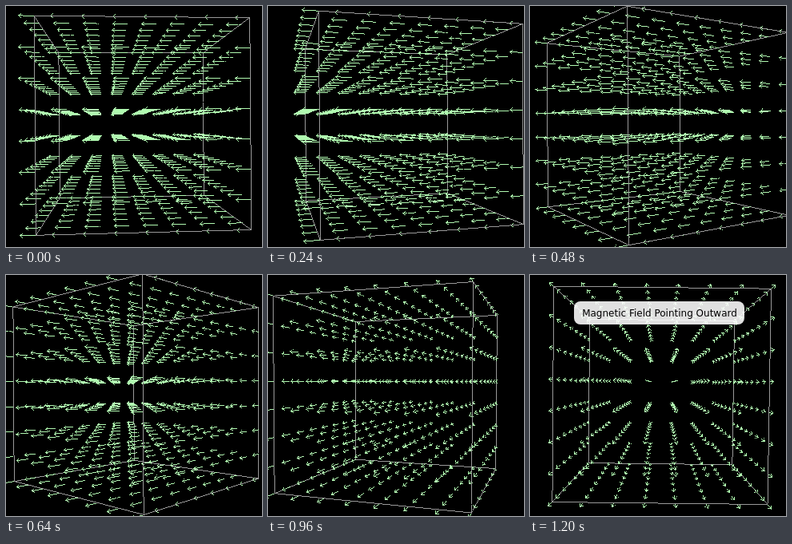
These frames come from a looping animation (320x302 px, 1.28 s). An HTML page with a canvas:

```html
<!DOCTYPE html>
<html lang="en">
<head>
<meta charset="utf-8">
<title>Rotating magnetic field</title>
<style>
  html, body { margin: 0; height: 100%; overflow: hidden; background: #000; }
  canvas { display: block; }
</style>
</head>
<body>
<canvas id="stage" width="320" height="302"></canvas>
<script>
const ctx = document.getElementById('stage').getContext('2d');
const STEP = 80, STEPS = 16;
const FOCAL = 541, DISTANCE = 5, CX = 163.5, CY = 148.2;
const GRID = 8, ARROW = 1 / 7;

// [step, yaw, pitch, roll] in degrees
const KEYS = [
  [0, 4, 0, -0.45],
  [3, 15.6, 0.2, -0.35],
  [5, 27.1, 0.36, -0.4],
  [8, 47, 0.3, -0.25],
  [10, 58.2, 0.3, 0],
  [12, 71.5, 1.75, 0.1],
  [15, 90, 1.2, 0.65]
];

function poseAt(step) {
  const i = Math.max(1, KEYS.findIndex(k => k[0] >= step));
  const a = KEYS[i - 1], b = KEYS[i];
  const t = (step - a[0]) / (b[0] - a[0]);
  return [1, 2, 3].map(j => (a[j] + (b[j] - a[j]) * t) * Math.PI / 180);
}

// Returns a function from cube space (y up, z to the viewer) to [x, y, depth]
function camera([yaw, pitch, roll]) {
  const spin = (a, b, angle) => {
    const c = Math.cos(angle), s = Math.sin(angle);
    return [a * c + b * s, b * c - a * s];
  };
  return (x, y, z) => {
    [x, z] = spin(x, z, yaw);
    [z, y] = spin(z, y, pitch);
    [x, y] = spin(x, y, roll);
    const depth = DISTANCE - z;
    return [CX + FOCAL * x / depth, CY - FOCAL * y / depth, depth];
  };
}

// Hard-edged line, one pixel wide
function line(x1, y1, x2, y2) {
  const n = Math.max(1, Math.round(Math.max(Math.abs(x2 - x1), Math.abs(y2 - y1))));
  for (let i = 0; i <= n; i++) {
    const t = i / n;
    ctx.fillRect(Math.round(x1 + (x2 - x1) * t), Math.round(y1 + (y2 - y1) * t), 1, 1);
  }
}

// Draws either the far or the near edges of the cube
function drawBox(project, far) {
  const edge = (p, q) => {
    const [x1, y1, d1] = project(...p), [x2, y2, d2] = project(...q);
    if ((d1 + d2 > 2 * DISTANCE) === far) line(x1, y1, x2, y2);
  };
  ctx.fillStyle = '#999';
  for (const a of [-1, 1]) {
    for (const b of [-1, 1]) {
      edge([-1, a, b], [1, a, b]);
      edge([a, -1, b], [a, 1, b]);
      edge([a, b, -1], [a, b, 1]);
    }
  }
}

function drawArrow(project, x, y, z) {
  const [x1, y1] = project(x, y, z);
  const [x2, y2, depth] = project(x - ARROW, y, z);
  line(x1, y1, x2, y2);
  const length = Math.hypot(x2 - x1, y2 - y1);
  if (length < 0.75) return;
  const size = 12 / depth;
  const ux = (x2 - x1) / length * size, uy = (y2 - y1) / length * size;
  for (const side of [-0.8, 0.8]) {
    line(x2, y2, x2 - ux - uy * side, y2 - uy + ux * side);
  }
}

function drawField(project) {
  const at = i => i * 2 / (GRID - 1) - 1;
  ctx.fillStyle = '#b0fab0';
  for (let i = 0; i < GRID; i++)
    for (let j = 0; j < GRID; j++)
      for (let k = 0; k < GRID; k++)
        drawArrow(project, at(i), at(j), at(k));
}

function drawLabel() {
  ctx.fillStyle = 'rgba(255, 255, 255, 0.88)';
  ctx.beginPath();
  ctx.roundRect(55, 33, 213, 29, 8);
  ctx.fill();
  ctx.fillStyle = '#000';
  ctx.font = '12px "DejaVu Sans", sans-serif';
  ctx.textAlign = 'center';
  ctx.fillText('Magnetic Field Pointing Outward', 162, 52);
}

function draw(now) {
  const step = Math.floor(now / STEP) % STEPS;
  const project = camera(poseAt(step));
  ctx.fillStyle = '#000';
  ctx.fillRect(0, 0, 320, 302);
  drawBox(project, true);
  drawField(project);
  drawBox(project, false);
  if (step === STEPS - 1) drawLabel();
}

const start = performance.now();
function tick() {
  draw(performance.now() - start);
  requestAnimationFrame(tick);
}
tick();
</script>
</body>
</html>
```
